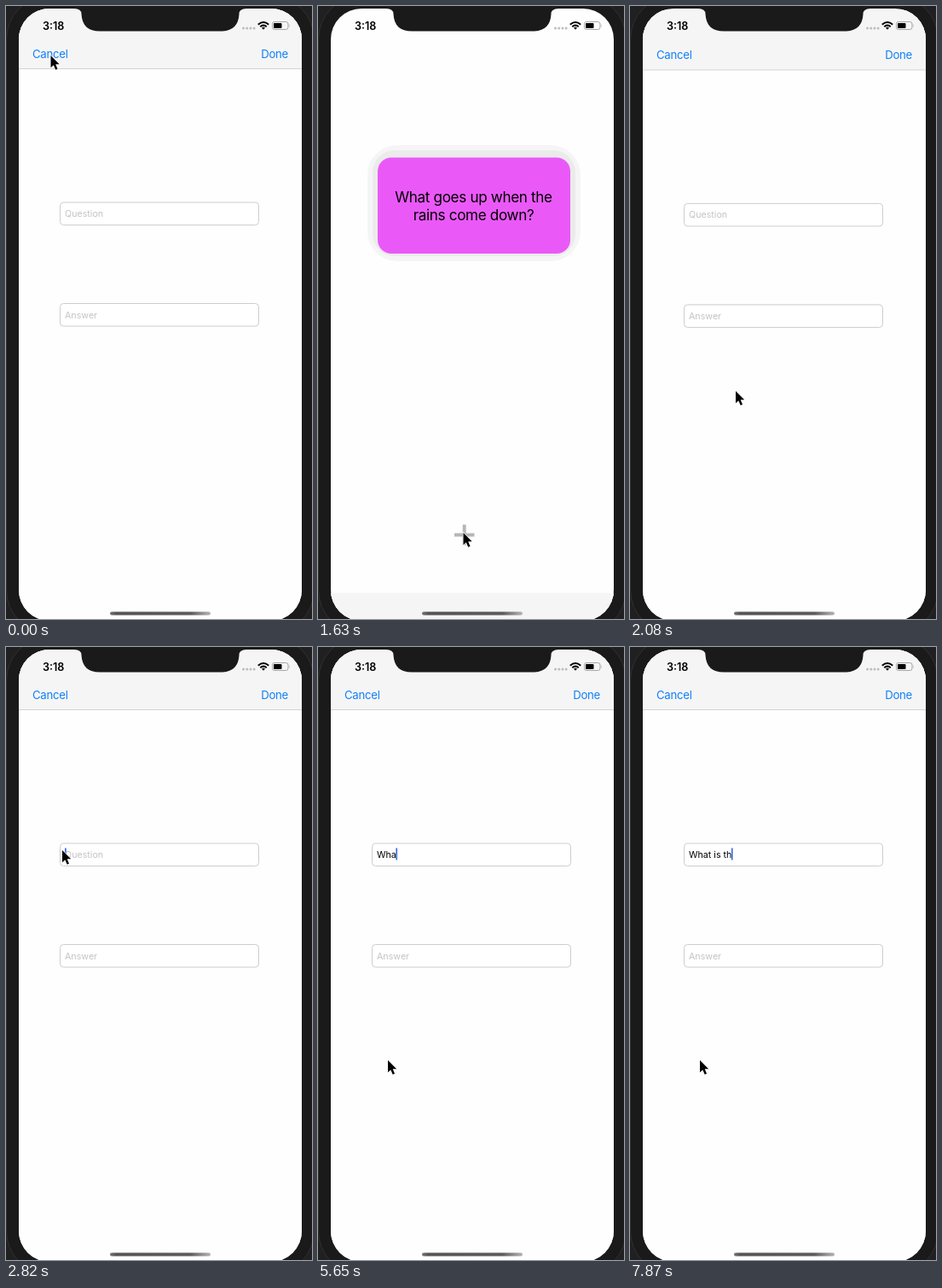
An HTML page for the animation above (8000 ms loop, 359x718 px).

```html
<!DOCTYPE html>
<html lang="en">
<head>
<meta charset="utf-8">
<title>Flashcard form</title>
<style>
  html, body { margin: 0; width: 100%; height: 100%; overflow: hidden; background: #202022; }
  svg { display: block; width: 359px; height: 718px; }
  text { font-family: Inter, Roboto, sans-serif; white-space: pre; }
  .bar { font-size: 13.2px; letter-spacing: -.02em; fill: #0f7ffa; }
  .card { font-size: 17.1px; letter-spacing: -.02em; text-anchor: middle; }
  .field { font-size: 10.7px; }
  .hint { fill: #c3c3c5; }
  .box { fill: #fff; stroke: #cdcdcd; }
</style>
</head>
<body>
<svg viewBox="0 0 359 718">
  <defs>
    <clipPath id="screen"><rect x="15" y="3" width="332" height="717" rx="36"/></clipPath>
    <linearGradient id="home">
      <stop offset="0" stop-color="#777"/>
      <stop offset=".06" stop-color="#555"/>
      <stop offset=".8" stop-color="#5c5c5c"/>
      <stop offset="1" stop-color="#b5b5b5"/>
    </linearGradient>
  </defs>

  <rect x=".5" y="-12" width="361" height="747" rx="51" fill="#1a1a1a" stroke="#303030"/>

  <g clip-path="url(#screen)">
    <rect width="359" height="718" fill="#fefefe"/>
    <rect x="58" y="163" width="250" height="136" rx="35" fill="#f5f5f5"/>
    <rect x="64" y="169" width="238" height="124" rx="26" fill="#ebebeb"/>
    <rect x="70" y="177.5" width="226" height="112.5" rx="16" fill="#ea59f8"/>
    <text class="card" x="182.5" y="229.5">What goes up when the</text>
    <text class="card" x="182.5" y="251">rains come down?</text>
    <path id="plus" d="M160 619.5h23.5M171.7 607.5v24" stroke="#000" stroke-width="4"/>

    <g id="sheet">
      <rect y="3" width="359" height="718" fill="#fefefe"/>
      <rect y="3" width="359" height="70" fill="#f5f5f5"/>
      <rect y="73" width="359" height="1" fill="#d4d4d4"/>
      <text class="bar" x="31" y="61">Cancel</text>
      <text class="bar" x="331" y="61" text-anchor="end">Done</text>
      <rect class="box" x="63.5" y="230" width="233" height="26.5" rx="4"/>
      <rect class="box" x="63.5" y="348.5" width="233" height="26.5" rx="4"/>
      <text class="field hint" id="hint" x="69" y="247">Question</text>
      <text class="field hint" x="69" y="365.5">Answer</text>
      <text class="field" id="typed" x="69" y="247"></text>
      <rect id="caret" y="235.5" width="1.7" height="14" fill="#3f6de8"/>
    </g>

    <rect x="122" y="709.5" width="118" height="4" rx="2" fill="url(#home)"/>
  </g>

  <path d="M80 0V3Q88.500 3 88.500 9.500Q89.500 29.500 110 29.500H252Q272.500 29.500 273.500 9.500Q273.500 3 282 3V0Z" fill="#1a1a1a"/>
  <text x="43" y="27.500" font-size="12.6" font-weight="600">3:18</text>
  <path d="M278.500 26h13" stroke="#bdbdbd" stroke-width="3" stroke-linecap="round" stroke-dasharray="0 4.200"/>
  <g fill="none" stroke="#000" stroke-width="2">
    <path d="M295.800 21.700Q302 16.300 308.200 21.700M298.300 24.300Q302 21 305.700 24.300"/>
    <path d="M302 27.800l-2-2.200q2-1.500 4 0z" fill="#000" stroke="none"/>
  </g>
  <rect x="312.500" y="18.500" width="18.500" height="9" rx="2.500" fill="none" stroke="#a5a5a5"/>
  <rect x="314" y="20" width="9.500" height="6" rx="1" fill="#000"/>
  <path d="M332.300 21.500q1.700 1.500 0 3z" fill="#a5a5a5"/>

  <path id="cursor" d="M0 0V14.300L3.300 11.200L5.700 16.800L8 15.800L5.700 10.300H10.200Z" stroke="#fff" stroke-width="1.300" paint-order="stroke"/>
</svg>
<script>
const $ = id => document.getElementById(id);
const LOOP = 8000, TICK = 148.4, HEIGHT = 715;

const path = [
  [0, 52.5, 58], [4, 52.5, 58], [9, 170.5, 617], [12, 170.5, 617], [14, 124, 451],
  [15, 80, 252], [16, 70, 225], [17, 64, 213], [18, 66, 238], [23, 66, 238],
  [26, 82, 484], [60, 82, 484]
];
const keys = [33, 36, 38, 41, 44, 47, 48, 49, 52, 53];
const blinks = [[18, 21], [24, 27], [29, 32], [33, 60]];

// Share of the way left in a critically damped spring
function spring(t) {
  const u = Math.max(0, t) * 2.71;
  return (1 + u) * Math.exp(-u);
}

function cursorAt(n) {
  const i = path.findIndex(p => p[0] > n);
  const [t0, x0, y0] = path[i - 1], [t1, x1, y1] = path[i];
  const k = (n - t0) / (t1 - t0), e = k * k * (3 - 2 * k);
  return [x0 + (x1 - x0) * e, y0 + (y1 - y0) * e];
}

function draw(ms) {
  const n = Math.floor(ms / TICK + .1);
  const hidden = n < 9 ? 1 - spring(n - .535) : spring(n - 10.88);
  $('sheet').setAttribute('transform', `translate(0 ${(HEIGHT * hidden).toFixed(1)})`);
  $('plus').setAttribute('opacity', n >= 10 ? .28 : 1);
  $('cursor').setAttribute('transform', `translate(${cursorAt(n)})`);

  const typed = 'What is th'.slice(0, keys.filter(k => k <= n).length);
  $('typed').textContent = typed;
  $('hint').setAttribute('opacity', typed ? 0 : 1);
  $('caret').setAttribute('x', 69 + (typed ? $('typed').getComputedTextLength() - .5 : 0));
  $('caret').setAttribute('opacity', blinks.some(([a, b]) => n >= a && n < b) ? 1 : 0);
}

const start = performance.now();
function frame() {
  draw((performance.now() - start) % LOOP);
  requestAnimationFrame(frame);
}
frame();
</script>
</body>
</html>
```
